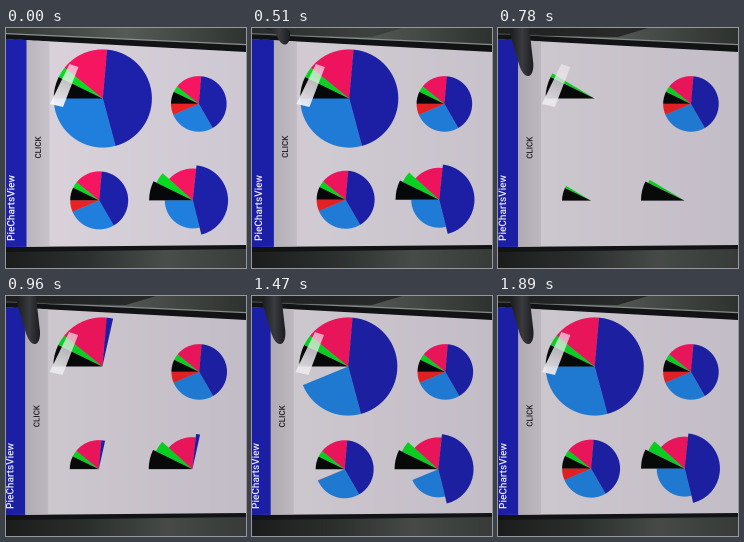
An HTML page with a canvas for the animation above (1.98 s loop, 240x240 px).

```html
<!DOCTYPE html>
<html lang="en">
<head>
<meta charset="utf-8">
<title>Pie charts</title>
<style>
  html, body { margin: 0; width: 100%; height: 100%; overflow: hidden; background: #242725; }
  canvas { display: block; width: 100vw; height: 100vh; }
</style>
</head>
<body>
<canvas id="stage" width="480" height="480"></canvas>
<script>
const ctx = document.getElementById('stage').getContext('2d');
const LOOP = 1980, STEP = 600 / 7;
const PRESS = 580, SWEEP_TIME = 1060;
const NAVY = '#1d20a9', SKY = '#207fdc', PINK = '#f51560', GREEN = '#08d921', BLACK = '#070809', RED = '#ea2226';

// Slices run clockwise from 180 degrees: [end angle, colour, radius factor].
const plain = [[206, BLACK], [219, GREEN], [275, PINK], [435, NAVY], [540, SKY]];
const withRed = [[206, BLACK], [219, GREEN], [275, PINK], [420, NAVY], [517, SKY], [540, RED]];
const stepped = [[206, BLACK, 1.56], [222, GREEN, 1.45], [276, PINK, 1.14], [436, NAVY, 1.26], [540, SKY]];

const clamp = x => Math.min(1, Math.max(0, x));
const ease = x => (1 - Math.cos(Math.PI * clamp(x))) / 2;

function gradient(x0, y0, x1, y1, ...colors) {
  const g = ctx.createLinearGradient(x0, y0, x1, y1);
  colors.forEach((c, i) => g.addColorStop(i / (colors.length - 1), c));
  return g;
}

function rect(fill, x, y, w, h) {
  ctx.fillStyle = fill;
  ctx.fillRect(x, y, w, h);
}

function poly(fill, ...pts) {
  ctx.fillStyle = fill;
  ctx.beginPath();
  pts.forEach(p => ctx.lineTo(...p));
  ctx.fill();
}

function pie(cx, cy, r, slices, sweep) {
  let from = 180;
  for (const [end, color, factor = 1] of slices) {
    const to = Math.min(end, 180 + sweep);
    if (to <= from) break;
    ctx.fillStyle = color;
    ctx.beginPath();
    ctx.moveTo(cx, cy);
    ctx.arc(cx, cy, r * factor, from * Math.PI / 180, to * Math.PI / 180);
    ctx.fill();
    from = end;
  }
}

function sideText(text, x, y, font, color) {
  ctx.save();
  ctx.translate(x, y);
  ctx.rotate(-Math.PI / 2);
  ctx.font = font;
  ctx.fillStyle = color;
  ctx.textAlign = 'center';
  ctx.textBaseline = 'middle';
  ctx.fillText(text, 0, 0);
  ctx.restore();
}

function phone(dx) {
  rect(gradient(0, 0, 240, 0, '#343835', '#565b57', '#303431'), 0, 0, 240, 30);
  rect(gradient(0, 0, 240, 0, '#1b1e1d', '#2c302e', '#4a4e4b', '#3a3e3b'), 0, 210, 240, 30);
  poly('#111315', [0, 6], [240, 17], [240, 221], [0, 224]);
  poly('#8d9091', [0, 5], [240, 16], [240, 17.3], [0, 6.3]);

  ctx.save();
  ctx.beginPath();
  [[0, 11], [240, 24], [240, 217], [0, 219]].forEach(p => ctx.lineTo(...p));
  ctx.clip();
  const edge = 20.5 + dx;
  rect(gradient(40, 0, 240, 0, '#d9d2da', '#cec8d3'), 0, 0, 240, 240);
  rect(gradient(edge, 0, edge + 23, 0, '#bab4bc', '#c1bbc3', '#c8c2ca'), edge, 0, 23, 240);
  rect('#1c20ac', 0, 0, edge, 240);
  ctx.restore();
  sideText('PieChartsView', 5.7 + dx, 180, '500 10px Roboto, sans-serif', '#f4f3fb');
  sideText('CLICK', 32.4 + dx, 119.5 - dx / 2, '500 8px Roboto, sans-serif', '#222226');
}

function hand(dx, entry) {
  if (!entry) return;
  rect(`rgba(20,20,22,${entry * .06})`, 0, 0, 240, 240);
  poly(`rgba(22,24,24,${entry * .7})`, [0, 0], [150, 0], [120, 9], [45, 8], [0, 6]);
  const x = 30 + dx * 1.5, tip = 63 * entry - 14;
  ctx.fillStyle = gradient(x - 16, 0, x + 6, 0, '#1d1f21', '#393b3e', '#1c1d20');
  ctx.beginPath();
  ctx.moveTo(x - 19, 0);
  ctx.lineTo(x + 2, 0);
  ctx.lineTo(x + 6, tip - 14);
  ctx.bezierCurveTo(x + 7, tip + 2, x - 3, tip + 4, x - 8, tip - 12);
  ctx.fill();
}

function draw(elapsed) {
  const step = Math.floor((elapsed % LOOP) / STEP + 1e-6);
  const time = Math.ceil(step * STEP / 30 - 1e-6) * 30;
  const dx = 2 * Math.sin(2 * Math.PI * (time / LOOP) ** .66);
  const px = dx * .3, py = -dx / 2;
  const sweep = time < PRESS ? 360 : 360 * ease((time - PRESS) / SWEEP_TIME);

  ctx.setTransform(2, 0, 0, 2, 0, 0);
  phone(dx);
  pie(96.8 + px, 70.5, 49.1, plain, sweep);
  pie(192.8 - px, 75.9, 27.8, withRed, 360);
  pie(93.2 + px, 172.4 + py, 29, withRed, sweep);
  pie(186.8 + px, 172.4 + py, 28, stepped, sweep);
  const glare = gradient(70, 37, 50, 78, 'rgba(250,247,252,.65)', 'rgba(250,247,252,.95)');
  poly(glare, [63.5 + px, 36], [72.5 + px, 39], [57 + px, 79], [44 + px, 76]);
  hand(dx, ease((time - 300) / 300));
}

function tick(now) {
  draw(now);
  requestAnimationFrame(tick);
}
requestAnimationFrame(tick);
</script>
</body>
</html>
```
